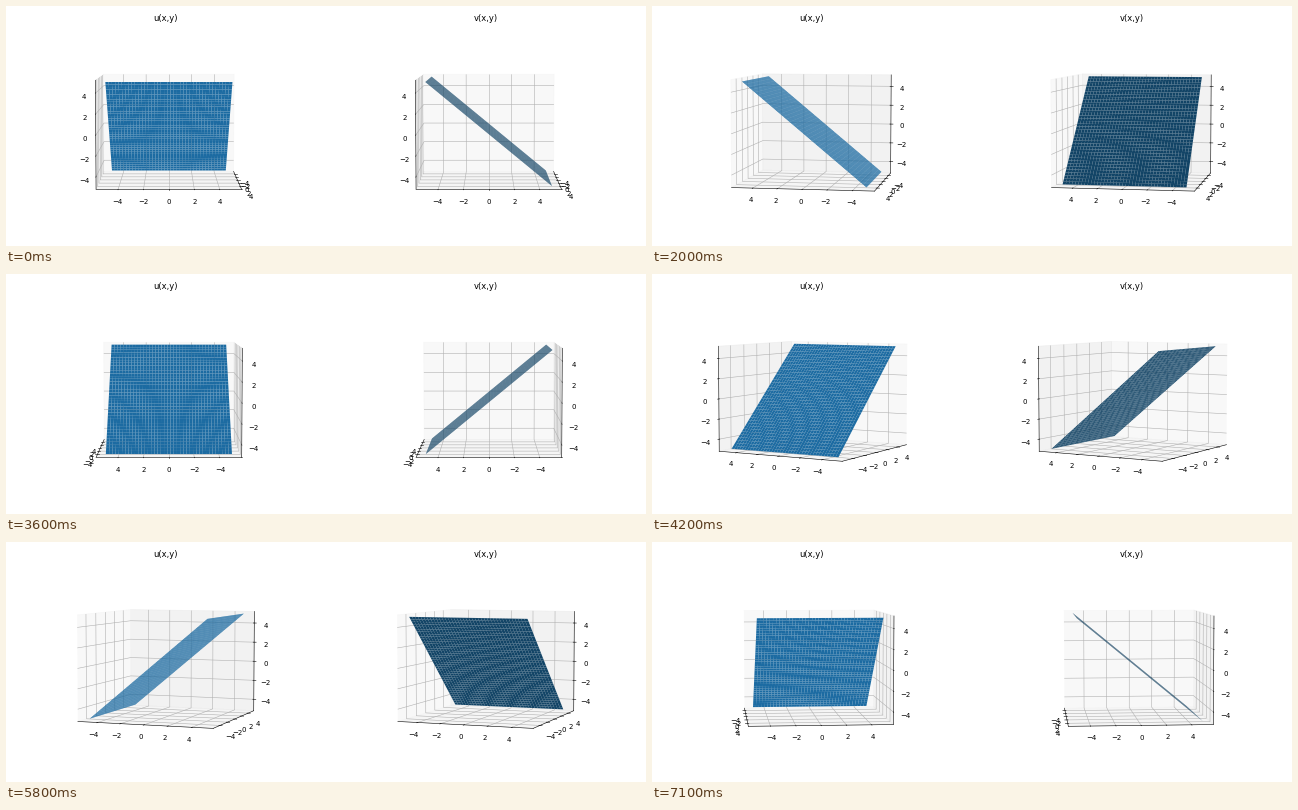
These frames come from a looping animation (640 px wide and 240 px high, 7.2 s). A matplotlib script:

```python
import matplotlib.pyplot as plt
import numpy as np
from matplotlib.animation import FuncAnimation

W, H, DPI = 640, 240, 50
SIDE = 213.8        # edge of each square plot area, px
BOTTOM = 7.5
STEP = 5            # degrees turned per frame
FRAMES = 360 // STEP
PAD = 25 / 24       # room around the data on each axis

fig = plt.figure(figsize=(W / DPI, H / DPI), dpi=DPI)
line = np.linspace(-5, 5, 40)
x, y = np.meshgrid(line, line)
w = np.conj(x + 1j * y)


def add_plot(center, values, title):
    rect = [(center - SIDE / 2) / W, BOTTOM / H, SIDE / W, SIDE / H]
    ax = fig.add_axes(rect, projection="3d")
    ax.plot_surface(x, y, values)
    ax.set_xlim(-5.5 * PAD, 5.5 * PAD)
    ax.set_ylim(-5.5 * PAD, 5.5 * PAD)
    ax.set_zlim(-5 * PAD, 5 * PAD)
    ax.set_title(title)
    return ax


axes = [add_plot(W / 4, w.real, "u(x,y)"), add_plot(3 * W / 4, w.imag, "v(x,y)")]


def update(frame):
    for ax in axes:
        ax.view_init(elev=5, azim=STEP * frame)
    return axes


anim = FuncAnimation(fig, update, frames=FRAMES, interval=100,
                     repeat=True, repeat_delay=0, blit=False)
plt.show()
```
